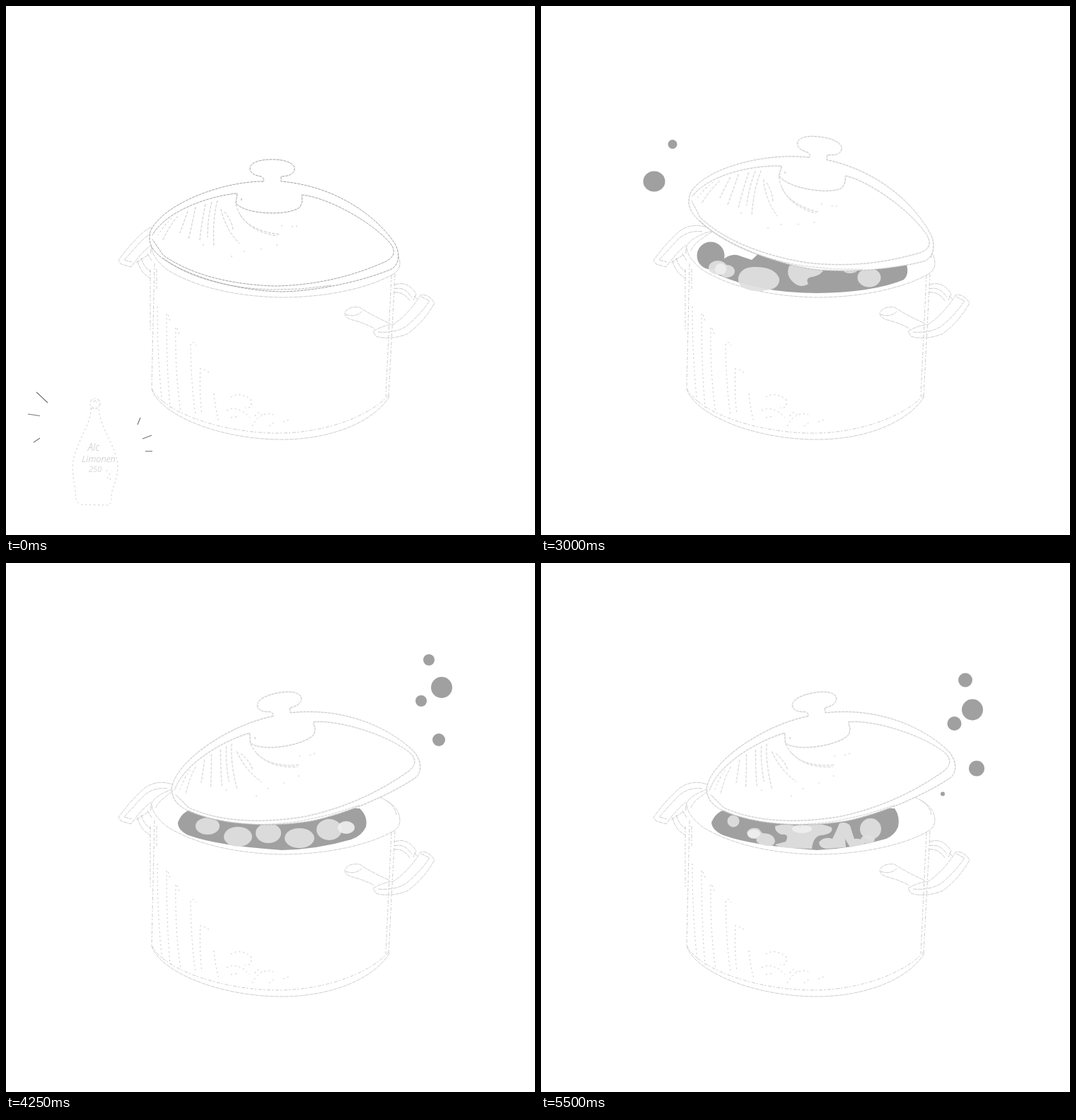
These frames come from a looping animation (748 px wide and 748 px high, 5750 ms). An HTML page without scripts:

```html
<!DOCTYPE html>
<html lang="de">
<head>
<meta charset="utf-8">
<title>Kochtopf</title>
<style>
html, body { margin: 0; width: 100%; height: 100%; overflow: hidden; background: #fff; }
svg { display: block; width: 100vw; height: 100vh; fill: none; stroke: #c4c4c4; stroke-width: .85; stroke-dasharray: 6 1; stroke-linejoin: round; }
text { stroke: none; fill: #a2a2a2; font: italic 300 14px "Open Sans", Inter, sans-serif; text-anchor: middle; }
.dots { stroke-dasharray: 2 4; stroke: #bdbdbd; }
.dash { stroke-dasharray: 5 2 2 3; }
.rays { stroke: #777; stroke-width: 1.2; stroke-dasharray: none; }
.dark { stroke: #999; }
.soup { fill: #a0a0a0; stroke: none; }
.foam { fill: #e0e0e0; }
.foam > * { fill-opacity: .93; }
.pale { fill: #eee; }

/* ingredients join one by one, then the pot boils */
.step, .lid, .boil { animation: 5750ms step-end infinite; }
.boil, .late { opacity: 0; }
.bottle { animation-name: bottle; }
.berries { animation-name: berries; }
.vanilla { animation-name: vanilla; }
.box { animation-name: box; }
.lid { animation-name: lid; fill: #fff; stroke: #929292; stroke-dasharray: 4 1; }
.b1 { animation-name: b1; }
.b2 { animation-name: b2; }
.b3 { animation-name: b3; }
.b4 { animation-name: b4; }
.b5 { animation-name: b5; }
.b6 { animation-name: b6; }
@keyframes bottle { 0% { opacity: 1 } 52.1739%, 100% { opacity: 0 } }
@keyframes berries { 0% { opacity: 0 } 13.0435% { opacity: 1 } 52.1739%, 100% { opacity: 0 } }
@keyframes vanilla { 0% { opacity: 0 } 26.087% { opacity: 1 } 52.1739%, 100% { opacity: 0 } }
@keyframes box { 0% { opacity: 0 } 39.1304% { opacity: 1 } 52.1739%, 100% { opacity: 0 } }
@keyframes lid {
  0% { transform: none; stroke: #929292 }
  52.1739%, 78.2609% { transform: translate(211px, 267px) rotate(7.4deg) translate(-204px, -322px); stroke: #acacac }
  65.2174%, 91.3043%, 100% { transform: translate(235px, 320px) rotate(-11.1deg) translate(-204px, -322px); stroke: #acacac }
}
@keyframes b1 { 0%, 56.5217%, 82.6087%, 100% { opacity: 0 } 52.1739%, 78.2609% { opacity: 1 } }
@keyframes b2 { 0%, 60.8696%, 86.9565%, 100% { opacity: 0 } 56.5217%, 82.6087% { opacity: 1 } }
@keyframes b3 { 0%, 65.2174%, 91.3043%, 100% { opacity: 0 } 60.8696%, 86.9565% { opacity: 1 } }
@keyframes b4 { 0%, 69.5652%, 95.6522%, 100% { opacity: 0 } 65.2174%, 91.3043% { opacity: 1 } }
@keyframes b5 { 0%, 73.913% { opacity: 0 } 69.5652%, 95.6522%, 100% { opacity: 1 } }
@keyframes b6 { 0%, 78.2609%, 100% { opacity: 0 } 73.913% { opacity: 1 } }
</style>
</head>
<body>
<svg viewBox="0 0 748 748">
<defs>
  <pattern id="scales" width="15" height="22" patternUnits="userSpaceOnUse" patternTransform="translate(250 640) rotate(8)">
    <path class="dark" d="M1 1C0 11 13 12 14 2M-6.500 12C-7 22 6 23 7 13M8.500 12C8 22 21 23 22 13M3 4Q3 8 7 8M10.500 15Q11 19 15 19"/>
  </pattern>
  <pattern id="scales2" href="#scales" patternTransform="translate(300 660) rotate(-14)"/>
</defs>

<g id="pot">
  <path d="M205 350C203 338 210 330 232 321C320 296 470 300 530 332C548 340 557 350 557 365Q556 375 546 380"/>
  <path d="M212 346Q216 334 246 317M538 336Q550 344 552 356"/>
  <path d="M206 342Q207 356 228 373C270 399 330 411 390 412C450 412 510 400 546 380"/>
  <path class="dash" d="M204 372V458M210 364L206 540M213 372V400M550 379L541 552M545 381L537 552"/>
  <path d="M206 541C216 577 300 613 390 613C460 613 520 588 542 552"/>
  <path class="dash" d="M206 541C225 577 310 604 385 604C450 604 515 580 541 550"/>
  <g class="dots">
    <path d="M214 425Q214 500 221 562M227 435Q227 510 232 568M229 437L232 445M240 455Q239 520 247 574M242 456L245 464M261 478Q262 540 268 578M264 475L269 480M275 512Q273 545 277 578M280 514L290 520M294 548Q296 570 301 588"/>
    <path d="M318 553Q330 545 346 556Q350 570 338 568M312 572Q328 564 345 582M318 582L330 580M348 594Q360 572 378 578M352 580Q356 570 364 580M372 594L380 588M392 588L400 585"/>
  </g>
  <!-- handles -->
  <path d="M240 315Q215 304 195 319Q174 338 159 360L163 365L177 369Q190 350 205 338M228 319Q205 316 189 335L167 359L178 362M184 363L201 352M186 360Q190 378 205 385M191 356Q195 370 205 376M200 350L206 360"/>
  <path d="M541 448Q516 437 500 426Q484 424 479 434Q479 441 490 444Q506 448 521 456M480 436Q494 441 503 432"/>
  <path d="M519 460Q532 452 548 450Q570 435 586 409Q597 406 606 420Q590 448 567 464Q542 473 523 467ZM526 461Q552 463 567 452Q586 436 599 417L587 411"/>
  <path d="M550 394Q568 388 580 407L576 416M549 400Q564 396 574 412M549 405Q563 404 571 417M577 410L582 415"/>
</g>

<g class="boil b1">
  <g class="soup">
    <circle cx="186" cy="195.500" r="6.500"/><ellipse cx="160" cy="248" rx="15.500" ry="14.500"/>
    <circle cx="240" cy="353" r="19.500"/>
    <path d="M250 366Q266 346 283 354L298 359L312 346L400 340L517 366Q521 379 513 387Q470 405 390 406Q310 406 250 380Z"/>
    <g class="foam">
      <path d="M279 384Q282 370 300 369Q330 368 337 385Q338 400 318 402Q300 406 283 397Q278 391 279 384Z"/>
      <path d="M350 370Q354 360 375 360L402 366Q400 380 384 383Q373 384 378 393Q366 401 354 388Q347 380 350 370Z"/>
      <ellipse cx="464" cy="384" rx="16.500" ry="13.500"/><ellipse cx="437" cy="372" rx="11" ry="6"/>
      <ellipse cx="250" cy="370" rx="13" ry="10"/><ellipse cx="263" cy="375" rx="11" ry="9"/><ellipse class="pale" cx="254" cy="372" rx="8" ry="8"/>
    </g>
  </g>
</g>
<g class="boil b2">
  <g class="soup">
    <circle cx="166" cy="168" r="8"/><circle cx="160" cy="205" r="15"/><circle cx="189" cy="186" r="9"/><circle cx="123" cy="220" r="6"/><circle cx="177" cy="243" r="7"/>
    <path d="M233 364Q238 348 260 344L290 338L400 350L514 370Q514 385 496 392Q440 407 390 406Q300 401 240 380Z"/>
    <g class="foam">
      <ellipse cx="268" cy="366" rx="15" ry="12"/><ellipse cx="313" cy="375" rx="22" ry="17"/><ellipse cx="357" cy="388" rx="20" ry="15"/>
      <ellipse cx="402" cy="386" rx="23" ry="13"/><ellipse cx="449" cy="384" rx="18" ry="13"/><ellipse class="pale" cx="481" cy="383" rx="11" ry="8"/>
    </g>
  </g>
</g>
<g class="boil b3">
  <g class="soup">
    <circle cx="170" cy="67" r="6.500"/><circle cx="197" cy="115.500" r="13"/><circle cx="154" cy="151" r="14"/><circle cx="173.500" cy="171" r="15.500"/>
    <ellipse cx="90" cy="187" rx="5.500" ry="4.500"/><circle cx="169" cy="236.500" r="7.500"/>
    <path d="M232 370Q231 354 249 347Q262 345 270 338L290 336L400 350L509 372Q508 387 495 392Q440 407 390 406Q300 401 240 380Q232 376 232 370Z"/>
    <g class="foam">
      <circle cx="153" cy="147" r="6"/><ellipse cx="163" cy="160" rx="6" ry="3" transform="rotate(-38 163 160)"/>
      <ellipse cx="292" cy="356" rx="16.500" ry="15"/><ellipse cx="278" cy="376" rx="11" ry="12"/><ellipse cx="333" cy="369" rx="18" ry="19"/>
      <path d="M325 400Q326 380 345 380Q361 381 363 404Q345 406 325 400Z"/>
      <path d="M357 390Q360 374 380 374Q397 376 403 389Q419 391 420 400L405 405L366 405Q357 400 357 390Z"/>
      <ellipse cx="429" cy="387" rx="20.500" ry="14"/><ellipse cx="475" cy="386" rx="16" ry="10"/><ellipse class="pale" cx="474" cy="387" rx="11" ry="8"/>
    </g>
  </g>
</g>
<g class="boil b4">
  <g class="soup">
    <circle cx="634" cy="257" r="8.500"/><circle cx="601.500" cy="331" r="16"/><circle cx="564" cy="321" r="5.500"/>
    <path d="M236 366Q238 351 262 346H500Q517 355 518 372Q516 385 500 391Q440 405 390 406Q290 400 245 380Q236 374 236 366Z"/>
    <g class="foam">
      <ellipse cx="261" cy="361" rx="15" ry="10.500"/>
      <path d="M271 372Q285 367 310 372Q345 368 361 377Q364 385 353 394Q344 405 325 402Q300 398 293 383Q284 376 271 375ZM275 388L288 391L282 393Z"/>
      <ellipse cx="384" cy="390" rx="23" ry="17"/><ellipse cx="434" cy="389" rx="20.500" ry="17"/>
      <ellipse cx="461" cy="369" rx="21" ry="19"/><path class="pale" d="M463 382Q467 373 481 373Q497 374 496 385Q489 393 476 388Q466 389 463 382Z"/><ellipse cx="497" cy="372" rx="7" ry="8"/>
      <path d="M441 389Q443 394 447 390" stroke="#fff"/>
    </g>
  </g>
</g>
<g class="boil b5">
  <g class="soup">
    <circle cx="600" cy="165.500" r="10"/><circle cx="610" cy="207.500" r="15"/><circle cx="584.500" cy="227" r="10"/><circle cx="616" cy="290.500" r="11"/><circle cx="568" cy="326.500" r="3"/>
    <path d="M241 367Q247 351 265 347H500Q508 358 505 373Q500 385 488 390Q440 404 390 406Q300 400 258 385Q242 378 241 367Z"/>
    <g class="foam">
      <circle cx="272" cy="365" r="8.500"/><path d="M291 381Q296 372 308 376L313 382Q329 382 331 393Q330 402 318 400Q302 396 305 390Q292 391 291 381Z"/>
      <path d="M331 372Q348 366 366 374Q388 364 411 374Q414 383 396 385Q385 386 383 404L350 403Q334 402 331 398L346 394Q352 382 340 384Q330 380 331 372Z"/>
      <path d="M393 395Q400 386 412 390Q418 378 422 368Q437 364 439 378L443 390Q455 388 458 398L437 402L430 390L431 402L403 404Q393 402 393 395Z"/>
      <ellipse cx="466" cy="376" rx="15" ry="15"/><ellipse cx="462" cy="391" rx="10" ry="6"/>
      <ellipse class="pale" cx="369" cy="376" rx="14" ry="6"/><ellipse class="pale" cx="301" cy="383" rx="9" ry="6"/>
    </g>
  </g>
</g>
<g class="boil b6">
  <g class="soup">
    <circle cx="598" cy="137" r="8"/><circle cx="616" cy="176" r="15"/><circle cx="587" cy="195" r="8"/><circle cx="612" cy="250" r="9"/>
    <path d="M243 367Q248 352 265 347H500Q512 358 509 373Q503 386 488 391Q440 405 390 406Q300 400 258 385Q243 378 243 367Z"/>
    <g class="foam">
      <ellipse cx="285" cy="372" rx="17" ry="12"/><ellipse cx="328" cy="387" rx="20" ry="14"/><ellipse cx="371" cy="382" rx="18" ry="14"/>
      <ellipse cx="415" cy="389" rx="21" ry="14"/><ellipse cx="457" cy="377" rx="18" ry="15"/><ellipse class="pale" cx="481" cy="374" rx="12" ry="9"/>
    </g>
  </g>
</g>

<g class="lid">
  <path d="M364 248C304 248 220 281 204 319C200 337 207 350 236 366C280 390 340 403 390 404C445 403 510 387 545 372C557 365 557 349 550 336C526 300 470 255 389 248V241C400 241 408 237 408 230C408 222 394 217 377 217C356 217 345 222 345 230C345 236 352 240 361 241Q366 244 364 248"/>
  <path fill="none" d="M326 265C285 269 225 291 207 324M418 267C452 270 515 303 543 335C553 348 548 357 533 363C480 386 430 395 380 396C320 394 262 381 222 352L207 330"/>
  <path fill="none" d="M222 356C262 389 330 400 378 401L418 400L460 395" stroke-opacity=".7"/>
  <path fill="none" d="M327 265L325 279C340 296 402 297 416 284L419 276L418 268M333 272V275"/>
  <g class="dots" fill="none">
    <path d="M243 297Q230 312 221 333M257 290L246 321M268 284Q264 305 258 330M282 280Q276 310 274 331M291 277Q285 300 285 327M299 275Q292 300 294 339M304 287Q310 315 330 336M309 291Q320 305 321 317M325 280Q335 318 384 325M331 295Q345 318 388 323" stroke-dasharray="4 2"/>
    <path d="M234 300L220 316M226 308L212 328M278 338h3M318 354h3M336 347h4M360 343l3 2M382 338h2M389 311l5 -1M404 312l9 -1"/>
  </g>
</g>

<g class="step bottle">
  <path class="rays" d="M43 546L59 561M31 577L48 579.500M39 617L48 611M190 582L186 592M193 612L206 607M197 629.500H207"/>
  <circle class="dash" cx="126" cy="562" r="7"/><path d="M123 560Q126 556 129 561"/>
  <path class="dots" d="M120 569C121 592 96 620 94 652C95 675 100 687 98 694Q101 705 108 705L146 706Q150 700 149 690C152 677 158 668 158 650C156 622 134 600 131 569ZM143 656L140 661M147 661L142 670M148 668L145 673"/>
  <g style="opacity:.7"><text x="124" y="629">Alc</text><text x="131" y="645" style="font-size:13px">Limonen</text><text x="126" y="659" style="font-size:11px">250</text></g>
</g>

<g class="step late berries">
  <path class="rays" d="M427 654L420 661M426 673L434 675M428 704L434 702M221 721L230 727M232 735L238 741M243 742L245 745"/>
  <path class="dark" fill="url(#scales)" d="M262 641Q248 643 249 653Q242 660 247 668Q242 678 248 685Q248 694 258 695Q265 705 276 702Q286 707 292 697Q302 695 303 683Q311 675 306 665Q309 652 299 648Q294 640 281 641Q270 637 262 641Z"/>
  <path class="dark" fill="#fff" d="M263 634Q270 625 280 630Q283 619 289 615L294 619Q288 624 285 630Q296 626 301 634Q291 633 286 639L277 651L276 638Q269 634 263 634ZM272 633L281 636L296 632"/>
  <path fill="#fff" stroke="none" d="M302 668L296 705L340 722L360 700L350 662Z"/>
  <path class="dark" fill="url(#scales2)" d="M314 657Q300 659 301 668Q291 672 295 682Q286 690 292 697Q289 708 299 710Q303 722 315 718Q326 727 336 720Q349 723 354 712Q365 708 362 696L357 673Q350 657 338 660Q326 651 314 657Z"/>
  <path stroke="#888" fill="#fff" d="M358 676Q345 652 348 633Q359 646 363 670Q370 658 387 655Q383 672 369 680Q380 681 390 686Q378 690 369 686Q384 697 388 713Q371 709 361 691Q359 718 344 735Q340 712 356 687Q343 686 335 675Q348 672 358 676Z"/>
  <path stroke="#999" d="M352 645Q358 660 361 678L384 658M362 681L382 686M364 686Q375 702 384 709M358 690Q352 712 346 727M341 677L357 681"/>
</g>

<g class="step late vanilla">
  <path class="rays" d="M541 580L545 587M558 589L561 588"/>
  <path class="dash" d="M494 612L505 610L520 612L535 610L557 612L558 640L556 665L558 719L540 721L525 719L495 720L493 690L494 660Z"/>
  <path d="M495 677L506 675M541 675L557 677"/>
  <text x="525" y="655" transform="rotate(-3 525 655)" style="font-size:14px;fill:#888">Vanille</text>
  <text x="532" y="674" transform="rotate(-4 532 674)" style="font-size:16px;fill:#888">Zucker</text>
  <path class="dark" d="M524 696Q514 691 512 684Q523 685 527 694Q529 685 535 680Q536 690 531 696Q541 688 550 689Q546 697 534 700Q544 704 546 711Q535 710 530 703Q528 713 517 718Q516 708 525 701Q514 705 503 700Q511 694 524 696Z"/>
</g>

<g class="step late box">
  <path class="rays" d="M680 485.500L687 500M707 488L698 502M714 511L720 508"/>
  <path stroke-dasharray="7 3 2 3" d="M603 541Q625 544 650 541Q680 544 706 541Q710 560 707 590V660L708 718Q680 721 655 718L602 720Q599 690 602 660L600 600Q602 565 600 546Z"/>
  <path class="dash" d="M604 668Q626 692 657 714M610 690L632 708M707 668Q672 700 624 718M707 692Q690 704 675 717M604 676L612 684"/>
  <circle cx="653" cy="564" r="8" fill="#eee" stroke="none"/>
  <g style="opacity:.65"><text x="654" y="583" style="font-size:11px">Feiner</text><text x="654" y="613" style="font-size:16px">Zucker</text></g>
</g>
</svg>
</body>
</html>
```
